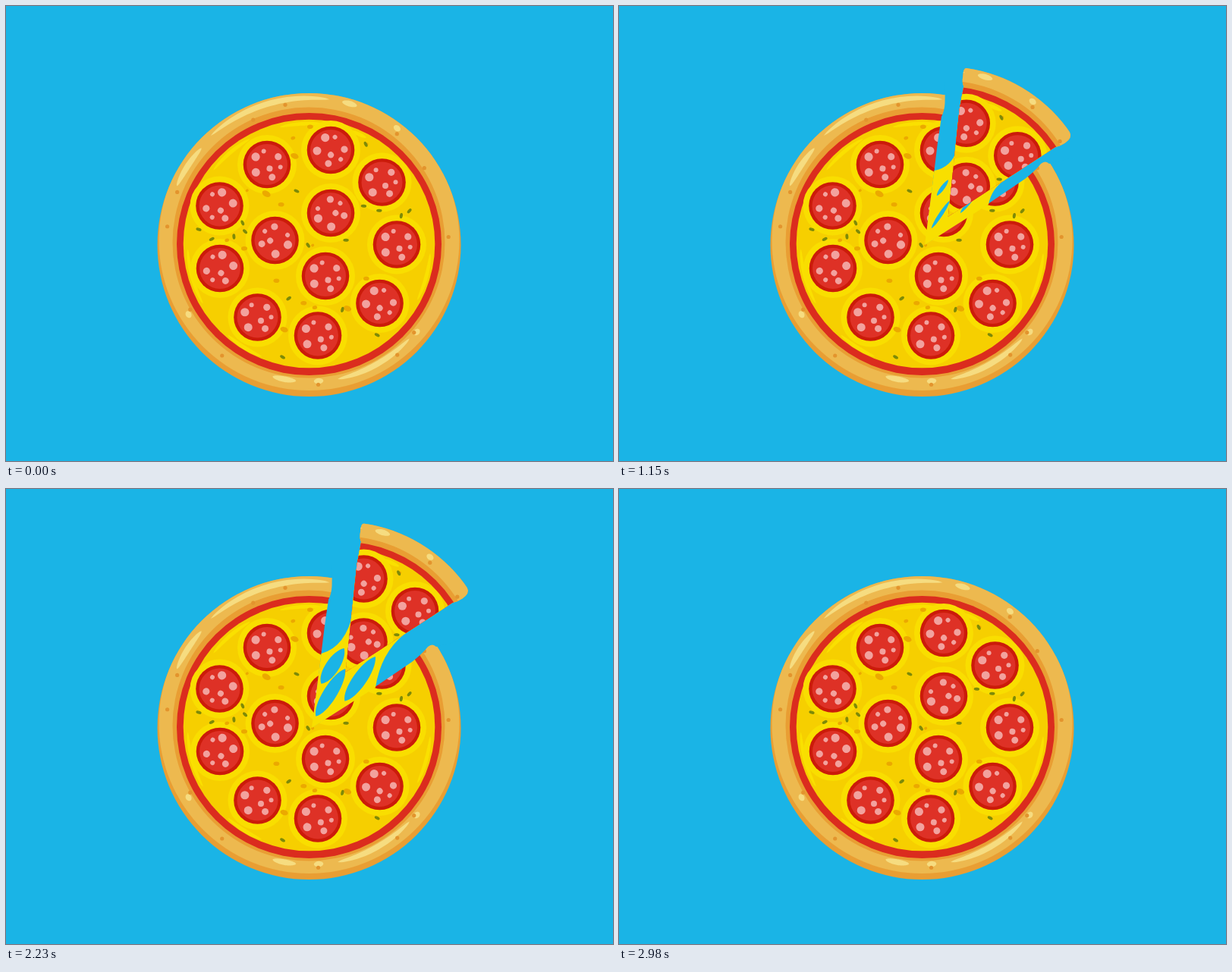
Animation of 800 by 600 pixels, one loop 3680 ms. Source, as an HTML page with a canvas:

```html
<!DOCTYPE html>
<html lang="en">
<head>
<meta charset="utf-8">
<title>Pizza slice</title>
<style>
html, body { margin: 0; width: 100%; height: 100%; overflow: hidden; background: #1ab4e6; }
canvas { display: block; }
</style>
</head>
<body>
<canvas id="stage" width="800" height="600"></canvas>
<script>
const ctx = document.getElementById('stage').getContext('2d');
const LOOP = 3680, START = 700, END = 2980, STEP = 30;
const BLUE = '#1ab4e6', STRAND = '#f8df00', CRUST = '#edb94f', TOAST = '#e99e33', GLOSS = '#f6dc80';
const CX = 399.5, CY = 315, RAD = Math.PI / 180;

// Every slice of pepperoni is one pattern, turned and sometimes mirrored: x, y, degrees, mirror
const PEPPERONI = [
  [344, 209, 12], [428, 190, 44], [495.5, 232.5, 0], [515, 314.5, 12],
  [492.5, 392, 44], [411, 434.5, 8], [331.5, 410.5, 0], [282, 346, -58, -1],
  [281.5, 263.5, -58, -1], [354.5, 309, 41, -1], [428, 273, -45], [421, 356, 12]
];
// Angle and radius of the spots around its rim
const SPOTS = [[-47, 4.6], [-1, 3], [56, 4.5], [133, 5.5], [202, 5.6], [244, 3]];

// Angle ranges of the highlights
const CRUST_SHINE = [[-156, -138], [-132, -82], [-77, -71], [-54.5, -51.5], [37.5, 40.5],
  [43, 78], [84, 88], [95.5, 105.5], [148.5, 151.5]];
const CHEESE_SHINE = [[-142, -119], [-104, -81], [-70, -62], [4, 27], [113, 132], [151, 178]];

const CUT = new Path2D('M404 314L415.5 217L420 180L425 146Q429 138 429.5 128L430 100H600V200L567 208Q562 203 556 208Q549 217 535 228L487 260.5Z');
const SLICE = new Path2D('M404 313L412.5 232L419 171L424.5 141Q422 136 423.5 128Q424 117 428 117L430 105H540L600 150L564.5 202Q568 209 558 216Q552 220 545 221.5L525 234.5L480.5 263.5Z');

// Gaps in the cheese: lower tip, upper tip, how far the upper tip follows the slice and drifts right
const GAPS = [[419, 250, 412, 248, .74, 3], [412, 293, 416, 275, .68, 3], [450, 273, 467, 259, .27, 16]];

const mix = (a, b, u) => a + (b - a) * u;
const clamp = u => Math.max(0, Math.min(1, u));
const ease = u => (1 - Math.cos(Math.PI * clamp(u))) / 2;

let seed = 11;
const random = (lo, hi) => {
  seed = (seed * 16807) % 2147483647;
  return mix(lo, hi, seed / 2147483647);
};

const polar = (r, deg) => [CX + r * Math.cos(deg * RAD), CY + r * Math.sin(deg * RAD)];

// Random places on the cheese between the pepperoni
function scatter(count) {
  const spots = [];
  while (spots.length < count) {
    const [x, y] = polar(156 * Math.sqrt(random(0, 1)), random(0, 360));
    if (PEPPERONI.every(([px, py]) => Math.hypot(x - px, y - py) > 37))
      spots.push([x, y, random(0, 1)]);
  }
  return spots;
}
const herbs = scatter(17), browned = scatter(16);
const crumbs = Array.from({ length: 12 }, (_, i) => polar(random(178, 190), i * 30 + random(-12, 12)));

function oval(color, x, y, rx, ry = rx, deg = 0) {
  ctx.fillStyle = color;
  ctx.beginPath();
  ctx.ellipse(x, y, rx, ry, deg * RAD, 0, 7);
  ctx.fill();
}

// Band along a circle that narrows to both ends
function band(color, [from, to], r, width) {
  const n = 30;
  ctx.fillStyle = color;
  ctx.beginPath();
  for (let i = 0; i <= 2 * n; i++) {
    const u = i <= n ? i / n : 2 - i / n;
    const half = width / 2 * Math.sqrt(Math.max(0, Math.sin(Math.PI * u)));
    ctx.lineTo(...polar(r + (i <= n ? half : -half), mix(from, to, u)));
  }
  ctx.fill();
}

function drawPepperoni([x, y, turn, mirror = 1]) {
  oval('#cb1b0a', x, y, 31.3);
  oval('#de3126', x, y, 27);
  ctx.save();
  ctx.translate(x, y);
  ctx.rotate(turn * RAD);
  ctx.scale(mirror, 1);
  oval('#f2a29e', 4.5, 4.5, 4);
  for (const [a, r] of SPOTS) oval('#f2a29e', 18 * Math.cos(a * RAD), 18 * Math.sin(a * RAD), r);
  ctx.restore();
}

function drawPizza() {
  ctx.save();
  oval(TOAST, CX, CY, 200);
  ctx.beginPath();
  ctx.arc(CX, CY, 200, 0, 7);
  ctx.clip();
  oval(CRUST, CX, 309, 198);
  oval(TOAST, 399, 312, 179.5, 178.5);
  oval('#db2c1e', CX, 314, 174.5, 173);
  oval('#f6cf00', CX, 313.5, 165.8, 163.8);

  for (const arc of CRUST_SHINE) band(GLOSS, arc, 187 - 7 * Math.sin((arc[0] + arc[1]) / 2 * RAD), 7.5);
  for (const [x, y] of crumbs) oval('#e3942d', x, y, 2.6);
  for (const arc of CHEESE_SHINE) band('#fae000', arc, 160, 5);
  for (const [x, y] of PEPPERONI) oval('#f9de00', x, y, 39);
  for (const [x, y, u] of browned) oval('#eba900', x, y, 2 + 4 * u, 1.8 + 2 * u, 60 * u - 30);
  for (const [x, y, u] of herbs) oval('#7d8a08', x, y, 3.7, 2, 180 * u);
  PEPPERONI.forEach(drawPepperoni);
  ctx.restore();
}

// Cheese strands between the base and the slice moved by dx, dy
function drawCheese(t, up, back, dx, dy) {
  const leftX = y => 404 + (313 - y) * .1327;
  const rightY = x => 315 - (x - 404) * .66;
  const ly = 217 + 28 * back, lx = leftX(ly);
  const rx = 487 + 24 * back, ry = rightY(rx);
  const sliceY = 216 + 16 * up + 20 * back, sliceX = 478 + 3 * up + 14 * back;
  const sx = leftX(sliceY) + dx, sy = sliceY + dy;
  const ex = sliceX + dx, ey = rightY(sliceX) + dy - 1;

  ctx.fillStyle = STRAND;
  ctx.beginPath();
  ctx.moveTo(403, 315);
  ctx.lineTo(lx - 1.2, ly);
  ctx.quadraticCurveTo(mix(lx, sx, .75), mix(ly, sy, .15), sx, sy);
  ctx.lineTo(ex, ey);
  ctx.quadraticCurveTo(mix(rx, ex, .19), mix(ry, ey, .64), rx, ry + 1.2);
  ctx.fill();

  const rip = clamp((t - 940) / 1800), sag = rip * rip;
  const width = Math.max(0, 11 * rip - .17 * dy - 2);
  ctx.save();
  ctx.clip(CUT);
  ctx.fillStyle = BLUE;
  for (const [x0, y0, x1, y1, follow, drift] of GAPS) {
    const ax = x0 - 7 * sag, ay = y0 + 13 * sag;
    const bx = x1 + follow * dx + drift * sag, by = y1 + .53 * dy;
    const k = width * .667 / Math.hypot(bx - ax, by - ay);
    const side = (u, s) => [mix(ax, bx, u) + s * k * (by - ay), mix(ay, by, u) + s * k * (ax - bx)];
    ctx.beginPath();
    ctx.moveTo(ax, ay);
    ctx.bezierCurveTo(...side(.15, 1), ...side(.8, 1), bx, by);
    ctx.bezierCurveTo(...side(.8, -1), ...side(.15, -1), ax, ay);
    ctx.fill();
  }
  ctx.restore();
}

function drawCutOut(t) {
  const up = ease((t - 635) / 1040), back = ease((t - 2485) / 510);
  const dx = 43.5 * (1 - (1 - up) ** 1.7) * (1 - back);
  const dy = -71.5 * up * (1 - back);
  ctx.fillStyle = BLUE;
  ctx.fill(CUT);
  drawCheese(t, up, back, dx, dy);
  ctx.save();
  ctx.translate(dx, dy);
  ctx.clip(SLICE);
  drawPizza();
  ctx.restore();
}

function draw(now) {
  const t = now % LOOP;
  ctx.fillStyle = BLUE;
  ctx.fillRect(0, 0, 800, 600);
  drawPizza();
  if (t >= START && t < END) drawCutOut(t - (t - START) % STEP);
}

const begin = performance.now();
function tick() {
  draw(performance.now() - begin);
  requestAnimationFrame(tick);
}
tick();
</script>
</body>
</html>
```
